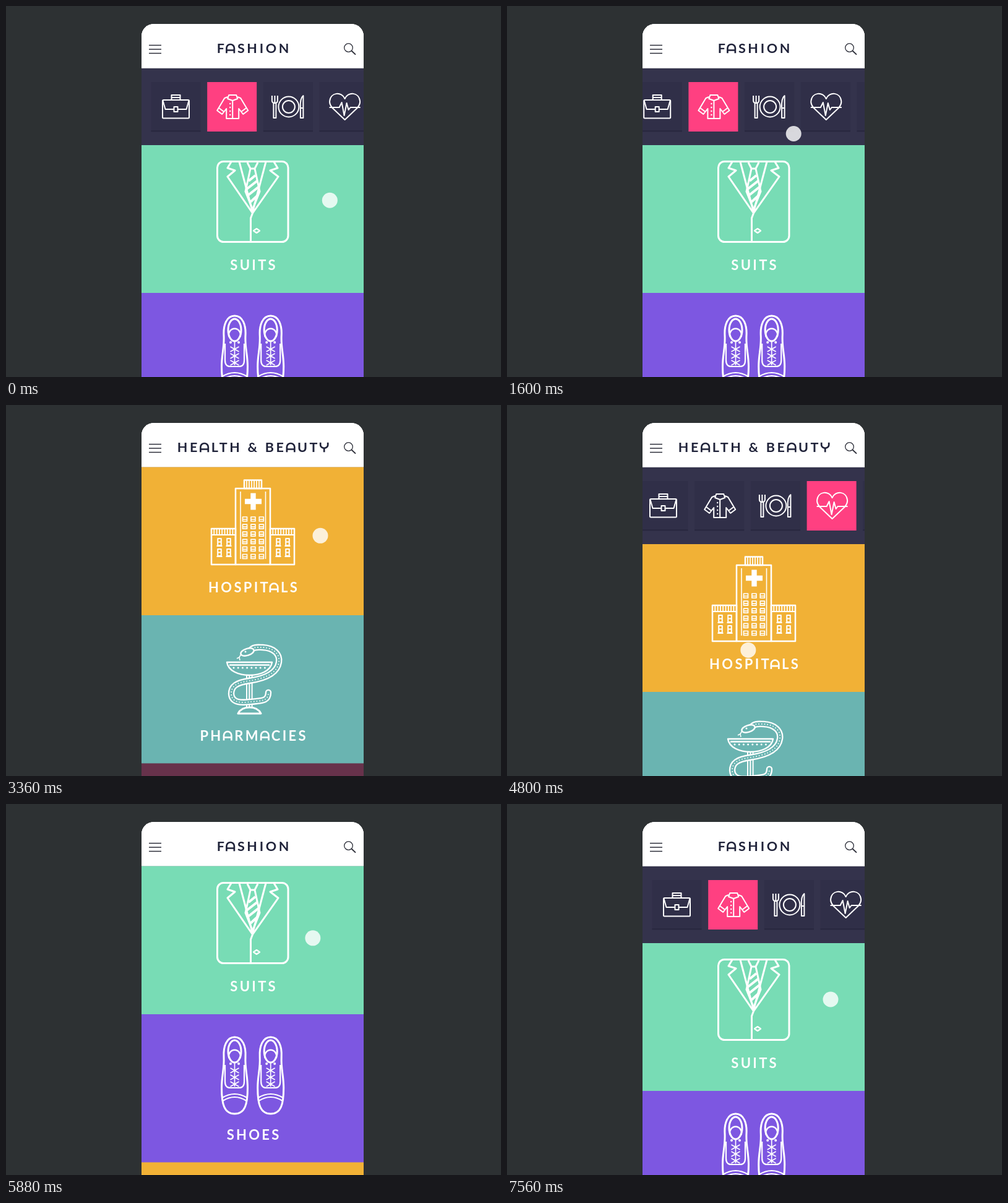
Write an HTML page that moves like this. It is 800 px wide and 600 px high and loops after 7.6 s.

```html
<!DOCTYPE html>
<html lang="en">
<head>
<meta charset="utf-8">
<title>Category menu</title>
<style>
html, body { margin: 0; width: 100%; height: 100%; overflow: hidden; background: #2d3133; }
#phone, svg { position: absolute; left: 0; top: 0; width: 800px; height: 600px; }
#phone { clip-path: inset(29px 222px 0 219px round 20px 20px 0 0); background: #fff; }
#strip { position: absolute; left: 0; top: 101px; width: 800px; overflow: hidden; z-index: 3; background: #34334c; }
#strip svg { height: 124px; overflow: visible; }
#over { z-index: 4; }
text { font: 700 22px Lato, Inter, sans-serif; letter-spacing: 3.3px; text-anchor: middle; }
.title text { font-size: 21.5px; letter-spacing: 3.7px; }
.line { fill: none; stroke: #fff; stroke-width: 3; stroke-linejoin: round; }
.line .dot, .line .solid { fill: #fff; stroke: none; }
</style>
</head>
<body>
<div id="phone">
  <svg id="fashion"></svg>
  <svg id="health"></svg>
  <div id="strip"><svg viewBox="0 101 800 124"><g id="tiles"></g></svg></div>
  <svg id="over">
    <clipPath id="body"><rect y="101" width="800" height="499"/></clipPath>
    <g clip-path="url(#body)"><circle id="ripple" fill="#fff"/></g>
    <g fill="none" stroke="#2b2d38" stroke-width="1.3">
      <path d="M231 63.5h20M231 70h20M231 76.5h20"/>
      <circle cx="553.5" cy="67.5" r="6.8"/><path d="M558.5 72.5l6.5 6.2" stroke-width="1.8"/>
    </g>
    <circle id="cursor" r="12.5" fill="#fff" opacity=".81"/>
  </svg>
</div>
<script>
const $ = id => document.getElementById(id);
const rep = (n, fn) => Array.from({ length: n }, (_, i) => fn(i)).join('');
const path = (d, attrs = '') => `<path d="${d}" ${attrs}/>`;
const dot = (x, y, r) => `<circle class="dot" cx="${x}" cy="${y}" r="${r}"/>`;
const box = (x, y, w, h, attrs = '') => `<rect x="${x}" y="${y}" width="${w}" height="${h}" ${attrs}/>`;
const at = (x, y, body, attrs = '') => `<g transform="translate(${x} ${y})" ${attrs}>${body}</g>`;

// Rounded letterforms replace the plain A and Y; [advance in em, outline]
const glyphs = {
  A: [.69, 'M-6.2 0V-8.3A6.2 6 0 0 1 6.2 -8.3V0M-6.2 -4.8H6.2'],
  Y: [.65, 'M-6 -15.5V-11.5A6 5 0 0 0 6 -11.5V-15.5M0 -6.5V0'],
};
const label = (str, y, gap) => `<text x="${399 + gap / 2}" y="${y}">` +
  str.replace('&', '&amp;').replace(/[AY]/g, c => `<tspan fill="none">${c}</tspan>`) + '</text>';

function roundLetters() {
  document.querySelectorAll('text').forEach(el => {
    const size = parseFloat(getComputedStyle(el).fontSize);
    let shapes = '';
    [...el.textContent].forEach((c, i) => {
      if (!glyphs[c]) return;
      const [w, d] = glyphs[c], p = el.getStartPositionOfChar(i);
      shapes += at(p.x + w * size / 2, p.y, path(d));
    });
    el.insertAdjacentHTML('afterend', `<g fill="none" stroke="currentColor" stroke-width="2.7">${shapes}</g>`);
  });
}

const suit = box(341.5, 251.5, 114.5, 130, 'rx="10"') +
  path('M364 252L358 262 370 266 358 276 398.5 335 440 276 427 266 439 262 433 252M377 252L398.5 333 420 252') +
  path('M398.5 335L395.5 343V381M390 253L395 263H402L407 253M395 263L387 300 398.5 329 410 300 402 263') +
  path('M392 283L403 274M389 296L407 282M390 307L409 292M395 317L407 306', 'stroke-width="4"') +
  path('M400 363.5L405 360 410 363.5 405 367Z', 'stroke-width="2.2"');

const shoe = path('M0 0C13 0 18.5 15 17.5 32 16.5 52 21 62 21 82 21 108 17 124 0 124S-21 108 -21 82C-21 62 -16.5 52 -17.5 32 -18.5 15 -13 0 0 0Z') +
  '<ellipse cy="23" rx="10.5" ry="18"/>' +
  path('M-9 34A9.5 10 0 1 1 9 34', 'stroke-width="2.4"') +
  path('M-15.5 45V72Q-15.5 82 -7 82H7Q15.5 82 15.5 72V45M-20 98Q0 86 20 98M-19 103Q0 91 19 103', 'stroke-width="2.2"') +
  path('M0 40V80' + rep(3, i => `M-7 ${50 + i * 11}l14 8m0 -8l-14 8`), 'stroke-width="1.7"') +
  dot(-6.5, 43, 2) + dot(6.5, 43, 2);

const wing = x => box(x, 200, 39, 58) + path(`M${x} 210h39` + rep(8, i => `M${x + 4.3 * (i + 1)} 201v9`), 'stroke-width="1.8"') +
  rep(4, i => at(x + 13 + 15 * (i % 2), 216 + 17 * (i >> 1),
    path('M-2.8 0H2.8V11H-2.8ZM-4.5 12H4.5M-3 5.5H3'), 'stroke-width="2"'));

const hospital = box(371, 135, 56, 123) + wing(332) + wing(427) +
  box(385, 121.5, 28, 13.5) + path(rep(6, i => `M${389 + 4 * i} 122v12`), 'stroke-width="1.7"') +
  path('M379 140V249M419.5 140V249', 'stroke-width="1.6"') +
  path('M395.3 142.5h8.4v9.3h9.3v8.4h-9.3v9.3h-8.4v-9.3h-9.3v-8.4h9.3z', 'class="solid"') +
  rep(18, i => at(386 + 13.4 * (i % 3), 184.5 + 12.1 * (i / 3 | 0), path('M-3.5 -3.5h7v7h-7zM-3.5 .5h7'), 'stroke-width="1.7"'));

const snake = 'M394 398C400 390 408 392 415 392C433 393 443 403 441 416C438 436 414 443 393 446C372 449 364 455 364 467C365 484 385 481 396 480C411 478 424 480 424 465';
const pharmacy = path('M357 416H430C428 430 411 437 393.5 437S359 430 357 416ZM361 420.5H426', 'stroke-width="2.4"') +
  rep(8, i => dot(368 + 7.2 * i, 425, 1.5)) +
  path('M389 437V489M393.3 437V489M397.6 437V489', 'stroke-width="2"') +
  path('M375 499Q380 489 393.5 489T412 499Z') +
  path(snake, 'stroke-width="10.4" stroke-linecap="round"') +
  path(snake, 'stroke-width="5.8" stroke-linecap="round" style="stroke:#6ab4b1"') +
  path(snake, 'stroke-width="1.7" stroke-dasharray="1.7 3"') +
  '<ellipse cx="390" cy="399.5" rx="11" ry="5.5" transform="rotate(-18 390 399.5)" fill="#6ab4b1" stroke-width="2.4"/>' +
  dot(387, 399, 1.5) + path('M380 403L377 408M373 410L377 408 378 413', 'stroke-width="1.5"');

const TOP = 224.5, STEP = 239.5;
const screen = (title, panels) =>
  box(0, 0, 800, 600, 'fill="#fff"') + box(0, 100, 800, 1, 'fill="#c9cbcd"') +
  `<g class="title" fill="#20233a" color="#20233a">${label(title, 76.3, 3.7)}</g><g class="panels">` +
  panels.map(([fill, name, art], i) => box(0, TOP + STEP * i, 800, STEP + 1, `fill="${fill}"`) +
    `<g class="line">${art}</g><g fill="#fff" color="#fff">${name && label(name, 427 + STEP * i, 3.3)}</g>`).join('') + '</g>';

$('fashion').innerHTML = screen('FASHION', [
  ['#78dcb5', 'SUITS', suit],
  ['#7d57e1', 'SHOES', at(369.5, 501, shoe) + at(427.7, 501, shoe)],
  ['#f1b136', '', ''],
]);
$('health').innerHTML = screen('HEALTH & BEAUTY', [
  ['#f1b136', 'HOSPITALS', at(0, 124, hospital, 'stroke-width="2.5"')],
  ['#6ab4b1', 'PHARMACIES', at(0, 124, pharmacy)],
  ['#67324b', '', ''],
]);

const icons = [
  box(-21.5, -11, 43, 29.5, 'rx="1.5"') + path('M-7 -11V-19H7V-11M-7 -15H7M-21 -10L-17 4H-3M3 4H17L21 -10M-3 0H3V8H-3Z'),
  path('M-5 -19H7L9 -13 1 -10 -7 -13ZM-7 -16L-12 -14 -24 6 -16 12 -9 3V19H11V3L18 12 26 6 14 -14 9 -16M1 -10V19M-21 2L-13 8M23 2L15 8') +
    rep(4, i => dot(-3, -5 + 6 * i, 1.2)),
  '<circle r="16.5" cx="1"/><circle r="10" cx="1"/>' +
    path('M-26 -18V-10Q-26 -6 -21.5 -6T-17 -10V-18M-21.5 -18V-6M-23.5 -6V18H-19.5V-6M20 18V2H24.5V18ZM20 2Q19 -14 24.5 -18V2'),
  path('M1 21L-19 2Q-24 -4 -23.5 -9C-22 -24 -4 -25 1 -13C6 -25 24 -24 25.5 -9Q26 -4 21 2Z') +
    path('M-24 1H-8L-4 -7 0 14 4 -6 7 5 10 1H26'),
  path('M-22 0L0 -19 22 0M-16 -4V18H16V-4M-5 18V4H5V18'),
];
$('tiles').innerHTML = icons.map((art, i) => at(274.5 + 90.7 * i, 163,
  box(-40, -40, 80, 80, 'class="tile"') + box(-40, 38.5, 80, 1.7, 'class="edge" fill="#27263d"') +
  `<g class="line" style="stroke-width:2">${art}</g>`)).join('');
roundLetters();

const LOOP = 7600;
const ramp = (t, a, b) => Math.min(1, Math.max(0, (t - a) / (b - a)));
const out = u => 1 - (1 - u) ** 2;
const inOut = u => u < .5 ? 2 * u * u : 1 - 2 * (1 - u) ** 2;
const linear = u => u;

// [start, end, x, y, ease x, ease y]
const moves = [
  [0, 160, 549, 176],
  [280, 640, 411, 176],
  [1360, 1760, 473, 279, out, u => u ** 2.4],
  [2160, 2500, 526, 163],
  [3320, 3600, 403, 341, linear],
  [3840, 4200, 403, 465],
  [4760, 5100, 345, 162.5],
  [5560, 5960, 502, 219],
  [6560, 6760, 401, 338, linear],
  [6880, 7240, 401, 463],
  [7400, 7560, 523, 316],
];
const taps = [
  { time: 2531, press: 2480, x: 526, y: 163, screen: 'health', tile: 3 },
  { time: 5423, press: 5140, x: 345, y: 162.5, screen: 'fashion', tile: 1 },
];

function cursorAt(t) {
  let x = 523, y = 316;
  for (const [a, b, tx, ty, ex = out, ey = out] of moves) {
    const u = ramp(t, a, b);
    x += (tx - x) * ex(u);
    y += (ty - y) * ey(u);
  }
  return [x, y];
}

function draw(t) {
  const fold = inOut(ramp(t, 2483, 2883)) - out(ramp(t, 3840, 4200)) +
    inOut(ramp(t, 5375, 5775)) - out(ramp(t, 6880, 7240));
  const f = Math.min(1, Math.max(0, fold));

  const tap = taps[t >= taps[0].time && t < taps[1].time ? 0 : 1];
  const age = (t - tap.time + LOOP) % LOOP;
  const radius = age < 632 ? 545 * out(age / 632) : 1000;
  for (const id of ['fashion', 'health']) {
    const top = id === tap.screen;
    $(id).style.zIndex = top ? 2 : 1;
    $(id).style.clipPath = top ? `circle(${radius}px at ${tap.x}px ${tap.y}px)` : 'none';
    $(id).querySelector('.panels').setAttribute('transform', `translate(0 ${-124 * f})`);
  }

  // The strip folds up under the header
  const squash = Math.max(0, 1 - 1.62 * f ** 2.135);
  const sheet = $('strip').firstChild.style;
  $('strip').style.height = Math.max(0, TOP - 101 - 124 * f) + 'px';
  sheet.transform = `perspective(1000px) translateY(${-83 * f ** 1.6}px) rotateX(${Math.acos(squash)}rad)`;
  sheet.filter = f ? `brightness(${1 - .55 * f})` : 'none';
  const scroll = t < 6400 ? -84 * out(ramp(t, 280, 920)) + 62 * out(ramp(t, 1360, 1760)) : 0;
  $('tiles').setAttribute('transform', `translate(${scroll} 0)`);
  document.querySelectorAll('.tile').forEach((el, i) => el.setAttribute('fill', i === tap.tile ? '#ff4081' : '#302f48'));
  document.querySelectorAll('.edge').forEach((el, i) => el.setAttribute('opacity', i === tap.tile ? 0 : 1));

  const press = taps.find(p => t >= p.press && t < p.time + 340);
  const ripple = $('ripple');
  ripple.setAttribute('opacity', press ? .09 * (1 - ramp(t, press.time + 100, press.time + 340)) : 0);
  if (press) {
    ripple.setAttribute('cx', press.x);
    ripple.setAttribute('cy', press.y);
    ripple.setAttribute('r', 125 * (t - press.press) / (press.time + 100 - press.press));
  }

  const [x, y] = cursorAt(t);
  $('cursor').setAttribute('cx', x);
  $('cursor').setAttribute('cy', y);
}

const start = performance.now();
function tick() {
  draw((performance.now() - start) % LOOP);
  requestAnimationFrame(tick);
}
tick();
</script>
</body>
</html>
```
